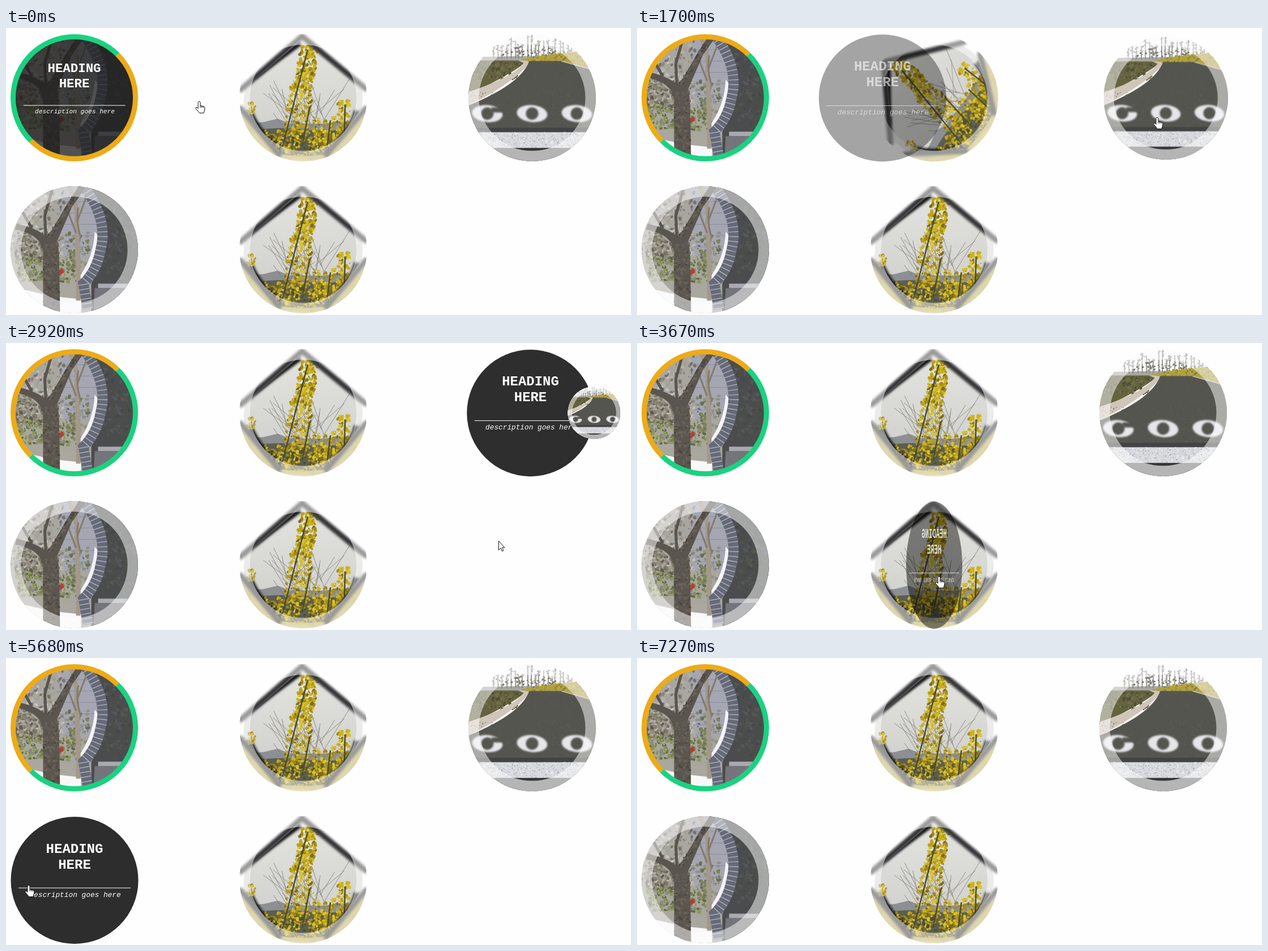
Write an HTML page with a canvas that moves like this. It is 1103 px wide and 508 px high and loops after 7.65 s.

```html
<!DOCTYPE html>
<html lang="en">
<head>
<meta charset="utf-8">
<title>Circle hover effects</title>
<style>
  html, body { margin: 0; width: 100%; height: 100%; overflow: hidden; background: #fefefe; }
  canvas { display: block; }
</style>
</head>
<body>
<canvas id="stage" width="1103" height="508"></canvas>
<script>
const ctx = document.getElementById('stage').getContext('2d');
const LOOP = 7650, R = 112.5, TAU = Math.PI * 2;

// The screen refreshes at these moments, in hundredths of a second.
const TICKS = [0, 12, 25, 40, 55, 67, 82, 95, 107, 132, 146, 158, 170, 185, 198, 213, 228, 240,
  255, 267, 280, 292, 307, 327, 340, 352, 367, 379, 394, 407, 432, 447, 462, 476, 488, 501,
  516, 528, 543, 556, 568, 583, 598, 613, 625, 637];

// Pointer path: time, x, y.
const PATH = [[0, 341, 129], [120, 430, 132], [250, 510, 134], [550, 563, 134], [1070, 565, 136],
  [1320, 642, 157], [1460, 780, 158], [1580, 880, 157], [1700, 918, 157], [2550, 918, 160],
  [2920, 869, 350], [3070, 759, 397], [3270, 615, 409], [3520, 533, 412], [4070, 533, 412],
  [4320, 480, 411], [4470, 356, 402], [4620, 215, 401], [5010, 110, 401], [5280, 87, 401],
  [5680, 40, 401], [5830, 38, 401], [5980, 20, 398], [6130, -20, 395]];

const SPOTS = [[120.5, 123.5], [524.5, 123.5], [928.5, 123.5], [120.5, 392.5], [524.5, 392.5]];

function disc(g, r, color) {
  g.fillStyle = color;
  g.beginPath();
  g.arc(0, 0, r, 0, TAU);
  g.fill();
}

// Builds a round picture with drawing helpers; the frame is a pale inner rim.
function photo(radius, rim, paint) {
  const canvas = document.createElement('canvas');
  canvas.width = canvas.height = 2 * R;
  const g = canvas.getContext('2d');
  let seed = 7;
  const rnd = () => (seed = (seed * 16807) % 2147483647) / 2147483647;
  g.translate(R, R);
  g.beginPath();
  g.arc(0, 0, radius, 0, TAU);
  g.clip();
  const fill = (color, d) => { g.fillStyle = color; g.fill(new Path2D(d)); };
  const line = (color, width, d) => {
    g.strokeStyle = color;
    g.lineWidth = width;
    g.stroke(new Path2D(d));
  };
  const dots = (n, x, y, w, h, size, colors, lean = 0) => {
    for (let i = 0; i < n; i++) {
      const v = rnd(), s = size * (.4 + rnd() * .6);
      g.fillStyle = colors[Math.floor(rnd() * colors.length)];
      g.beginPath();
      g.ellipse(x + w * rnd() + lean * v, y + h * v, s, s * .7, rnd() * 3, 0, TAU);
      g.fill();
    }
  };
  paint({ g, fill, line, dots, rnd });
  if (rim) {
    g.filter = 'none';
    g.setLineDash([]);
    g.strokeStyle = 'rgba(255,255,255,.5)';
    g.lineWidth = 18.5;
    g.beginPath();
    g.arc(0, 0, R - 9.25, 0, TAU);
    g.stroke();
  }
  return canvas;
}

function garden({ g, fill, line, dots }) {
  fill('#a8a6a0', 'M-113-113h226v226h-226z');
  fill('#a4a6b2', 'M-25-113h60l10 125h-65z');
  line('#8b8e9a', 1, 'M-20-85h60M-20-65h65M-20-45h65M-20-25h60M-20-5h60');
  dots(300, -113, -105, 95, 115, 4, ['#b6b1a8', '#8b857c', '#76716a', '#a39d90', '#c4c2be']);
  dots(170, -105, -30, 60, 55, 4, ['#5d5850', '#756d60', '#80806a', '#968d82']);
  dots(280, -100, 12, 112, 46, 4, ['#77814f', '#8c965f', '#606a45', '#a5a98a', '#8b8a72']);
  dots(60, -15, -30, 40, 55, 4, ['#7d8556', '#8f9186', '#696e54']);
  fill('#f8f8f8', 'M-113 62L-85 66L-50 76L12 82V113H-113z');
  fill('#aaa79f', 'M-100 58L-50 54L15 72V88L-40 82L-100 68z');
  fill('#b63e36', 'M-28 36l8-3 2 7-7 5z');
  fill('#4b4c4d', 'M26-113Q66-40 50 20L30 60V113H113V-113z');
  dots(180, 52, -90, 60, 142, 4, ['#52544e', '#454747', '#56575a', '#4c4f45']);
  fill('#a9aab1', 'M42 60h71v8H42z');
  fill('#74757a', 'M36 68h77v45H34z');
  fill('#f4f4f7', 'M36-32Q34 15 6 52l10 8Q42 30 46-20z');
  line('#a3988a', 8, 'M-10-113Q10-70 3-45Q8 0 7 90');
  line('#847a6d', 3, 'M7-75Q2-50 12-20M5-50L22-95M3-30L-12-70');
  const arch = 'M18-110Q61-52 46 2Q39 38 16 60L24 105';
  line('#666a78', 18, arch);
  g.setLineDash([1.3, 7.2]);
  line('#b4b8c4', 18, arch);
  g.setLineDash([]);
  fill('#5a554e', 'M-55 113L-55 2L-60-12Q-72-30-104-36L-102-46Q-70-40-50-24L-40-34L-10-85L8-113L20-110L-4-76L-30-16L-27 5L-25 113z');
  line('#59544d', 5, 'M-50-20L-52-60L-38-110M-75-38L-92-68');
  dots(150, -54, -15, 27, 128, 3, ['#6c655c', '#4c4740', '#625c54']);
  dots(60, -48, -22, 10, -74, 3, ['#6a635a', '#4c4740'], 46);
}

function flowers({ g, fill, line, dots, rnd }) {
  const gold = ['#cbb21c', '#bb9f18', '#a48b18', '#dac32a', '#7c6c22'];
  fill('#fefefe', 'M-113-113h226v226h-226z');
  g.filter = 'blur(4px)';
  fill('#bfb060', 'M-113 25L-80 50L0 95L80 50L113 25V113H-113z');
  dots(90, -113, 40, 226, 73, 6, ['#cdb830', '#a59a55', '#c5b978']);
  g.filter = 'none';
  g.save();
  g.clip(new Path2D('M0-105L102-18Q108 0 102 20L48 98Q0 108-48 98L-102 32Q-108 8-102-18z'));
  const sky = g.createLinearGradient(0, -100, 0, 50);
  sky.addColorStop(0, '#e3e3df');
  sky.addColorStop(1, '#d2d2cf');
  g.fillStyle = sky;
  g.fillRect(-113, -113, 226, 226);
  fill('#8d9093', 'M-113 46L-70 43L-45 37L-25 45L30 46L70 42L113 48V80H-113z');
  fill('#5c5e50', 'M-113 60Q-40 50 0 56T113 52V113H-113z');
  g.filter = 'blur(2px)';
  line('#101010', 11, 'M-88-37L-6-98M23-98L88-44');
  line('#0c0c0c', 16, 'M-98 24Q-80 70-40 96M98 24Q86 72 44 96');
  g.filter = 'none';
  dots(330, -85, 58, 170, 45, 4, [...gold, '#4d4e2c']);
  for (let i = 0; i < 34; i++) {
    const x = -35 + rnd() * 75, y = 20 + rnd() * 50;
    line('#807e70', .8, `M${x} ${y}l${(rnd() - .5) * 110} ${-25 - rnd() * 50}`);
  }
  dots(190, -3, -93, 32, 76, 4.2, gold, -14);
  dots(125, -24, -22, 42, 90, 4, gold, -10);
  dots(85, 60, 5, 22, 78, 4, gold);
  dots(130, 18, 34, 62, 55, 4, gold);
  dots(24, -99, 8, 14, 22, 3.5, gold);
  line('#4a4b2c', 2.5, 'M-37 88L8-85M-2 85L12 15M72 82L74 12M42 88L48 40');
  g.restore();
  g.filter = 'blur(2px)';
  line('#343436', 10, 'M-113-12L-2-109L113-14M-113 16L-40 104M113 16L38 104');
}

function road({ g, fill, line, dots, rnd }) {
  fill('#fafafa', 'M-113-113h226v226h-226z');
  fill('#a9a8a2', 'M-113-72L113-76V-60H-113z');
  for (let i = 0; i < 24; i++) {
    const x = -68 + i * 7.2 + rnd() * 3, top = -112 + rnd() * 20;
    line('#85837c', 1.6, `M${x}-70V${top}`);
    dots(9, x - 3, top, 6, -top - 74, 2.2, ['#83827c', '#a5a49e', '#706e68']);
  }
  fill('#b0a040', 'M-20-68L40-78L113-84V-46L55-62L-10-62z');
  dots(120, 0, -78, 113, 18, 2.5, ['#bfae35', '#9a8c3c', '#827c45']);
  fill('#65633f', 'M-113-66L-10-66Q-20-50-113-5z');
  dots(150, -110, -64, 88, 32, 3, ['#5a5838', '#74704c', '#4c4d36']);
  fill('#cfc5b8', 'M-25-66Q0-68-7-58Q-40-22-113 14V-10Q-30-38-15-62z');
  fill('#55554f', 'M-5-65L55-65L113-46V113H-113V14Q-20-24-5-65z');
  dots(420, -108, -10, 216, 65, 1, ['#605f5b', '#4a4a47', '#686762']);
  dots(160, -10, -60, 110, 60, 1, ['#605f5b', '#4d4d4a']);
  line('#c0b8a5', 2, 'M52-65L113-48');
  fill('#424345', 'M-113 53h226v8h-226z');
  fill('#d8d9de', 'M-113 61h226v28h-226z');
  dots(600, -112, 61, 224, 28, 1.3, ['#f4f4f7', '#bfc0c5', '#9d9ea4']);
  fill('#6a6a6a', 'M-113 89h226v24h-226z');
  dots(200, -90, 90, 180, 22, 1, ['#767676', '#5d5d5d']);
  fill('#343537', 'M-35 89h70q-35 9-70 0z');
  // Painted digits: thick sides, thin top and bottom.
  g.filter = 'blur(1.5px)';
  g.fillStyle = '#e6e6ea';
  for (const x of [-79, 0, 79]) {
    g.beginPath();
    g.ellipse(x, 28, 27, 15, .1, 0, TAU);
    g.ellipse(x, 28, 11, 11, .1, 0, TAU);
    g.fill('evenodd');
  }
  fill('#55554f', 'M-72 17h24v9h-24z');
}

const ringed = photo(104.5, false, garden);
const tree = photo(R, true, garden);
const bloom = photo(R, true, flowers);
const lane = photo(R, true, road);

const ease = x => x <= 0 ? 0 : x >= 1 ? 1 : x < .5 ? 2 * x * x : 1 - 2 * (1 - x) ** 2;
const hover = (t, on, onTime, off, offTime) =>
  ease((t - on) / onTime) * (1 - ease((t - off) / offTime));

function at(x, y, draw) {
  ctx.save();
  ctx.translate(x, y);
  draw();
  ctx.restore();
}

const picture = image => ctx.drawImage(image, -R, -R);

function label(size, small, half, rows) {
  ctx.fillStyle = '#fff';
  ctx.textAlign = 'center';
  ctx.font = `bold ${size}px "Liberation Mono", monospace`;
  ctx.fillText('HEADING', 0, rows[0]);
  ctx.fillText('HERE', 0, rows[1]);
  ctx.fillRect(-half, 13, 2 * half, 1);
  ctx.font = `italic ${small}px "Liberation Mono", monospace`;
  ctx.fillText('description goes here', 1, rows[2]);
}

function info(color) {
  disc(ctx, R, color);
  label(24, 12.8, 99, [-49, -21, 29]);
}

const SHADE = 'rgba(0,0,0,.6)', SOLID = '#2d2d2d';

function ringItem(t) {
  const p = 1 - ease((t - 30) / 800);
  at(...SPOTS[0], () => {
    picture(ringed);
    ctx.globalAlpha = p;
    disc(ctx, 104.5, 'rgba(26,26,26,.75)');
    label(22.4, 11.2, 90, [-46, -19, 27]);
    ctx.globalAlpha = 1;
    ctx.lineWidth = 9;
    ['#ecab18', '#1ad280'].forEach((color, i) => {
      const start = Math.PI * (.75 + i + p);
      ctx.strokeStyle = color;
      ctx.beginPath();
      ctx.arc(0, 0, 108, start, start + Math.PI);
      ctx.stroke();
    });
  });
}

function slideItem(t) {
  const p = hover(t, 115, 525, 1340, 800), [x, y] = SPOTS[1];
  at(x, y, () => { ctx.rotate(-p * Math.PI / 2); picture(bloom); });
  at(x - 2 * R * (1 - p), y + .5, () => { ctx.globalAlpha = p; info(SHADE); });
}

function shrinkItem(t) {
  const p = hover(t, 1575, 850, 2880, 720), [x, y] = SPOTS[2];
  const scale = 1 - .59 * p;
  const shift = t < 2880 ? 109 * p : 266 * p * scale;
  at(x - 3, y + .5, () => {
    ctx.globalAlpha = p;
    ctx.scale(.5 + p / 2, .5 + p / 2);
    info(SOLID);
  });
  at(x + shift, y, () => { ctx.scale(scale, scale); picture(lane); });
}

function flipItem(t) {
  const turn = Math.cos(Math.PI * hover(t, 4560, 470, 5930, 470)), [x, y] = SPOTS[3];
  if (turn > 0) at(x, y, () => { ctx.scale(turn, 1); picture(tree); });
  else at(x + .5, y + 1, () => { ctx.scale(-turn, 1); info(SOLID); });
}

function spinItem(t) {
  const p = hover(t, 3333, 800, 4470, 800), [x, y] = SPOTS[4];
  at(x, y, () => picture(bloom));
  at(x, y + 1, () => {
    ctx.globalAlpha = Math.min(1, 2.2 * p);
    ctx.scale(-Math.cos(Math.PI * p), 1);
    info(SHADE);
  });
}

const HAND = new Path2D('M5 11V2.500Q7-.5 9 2.500V8.500L14 9.500Q17 10 17 13L16 18L15 21.500H7.500L1 13.500Q0 10.500 3 11.500L5 13.500z');
const ARROW = new Path2D('M.5.5V16.500L4 13L6.500 18.500L9 17.500L6.500 12H11z');

function pointer(t) {
  const next = PATH.findIndex(key => key[0] > t);
  if (next < 0) return;
  const [t0, x0, y0] = PATH[next - 1], [t1, x1, y1] = PATH[next];
  const k = (t - t0) / (t1 - t0), x = x0 + (x1 - x0) * k, y = y0 + (y1 - y0) * k;
  const hand = t < 120 || SPOTS.some(([cx, cy]) => Math.hypot(x - cx, y - cy) < R);
  at(hand ? x - 7 : x, y, () => {
    const shape = hand ? HAND : ARROW;
    ctx.fillStyle = '#fff';
    ctx.strokeStyle = '#111';
    ctx.lineWidth = 1;
    ctx.fill(shape);
    ctx.stroke(shape);
    if (hand) ctx.stroke(new Path2D('M9 8V12M11.500 9V12M14 9.500V12.500'));
  });
}

const begin = performance.now();

function frame() {
  const now = (performance.now() - begin) % LOOP;
  const t = 10 * TICKS.findLast(tick => tick * 10 <= now);
  ctx.fillStyle = '#fefefe';
  ctx.fillRect(0, 0, 1103, 508);
  for (const item of [ringItem, slideItem, shrinkItem, flipItem, spinItem]) item(t);
  pointer(t);
  requestAnimationFrame(frame);
}
frame();
</script>
</body>
</html>
```
